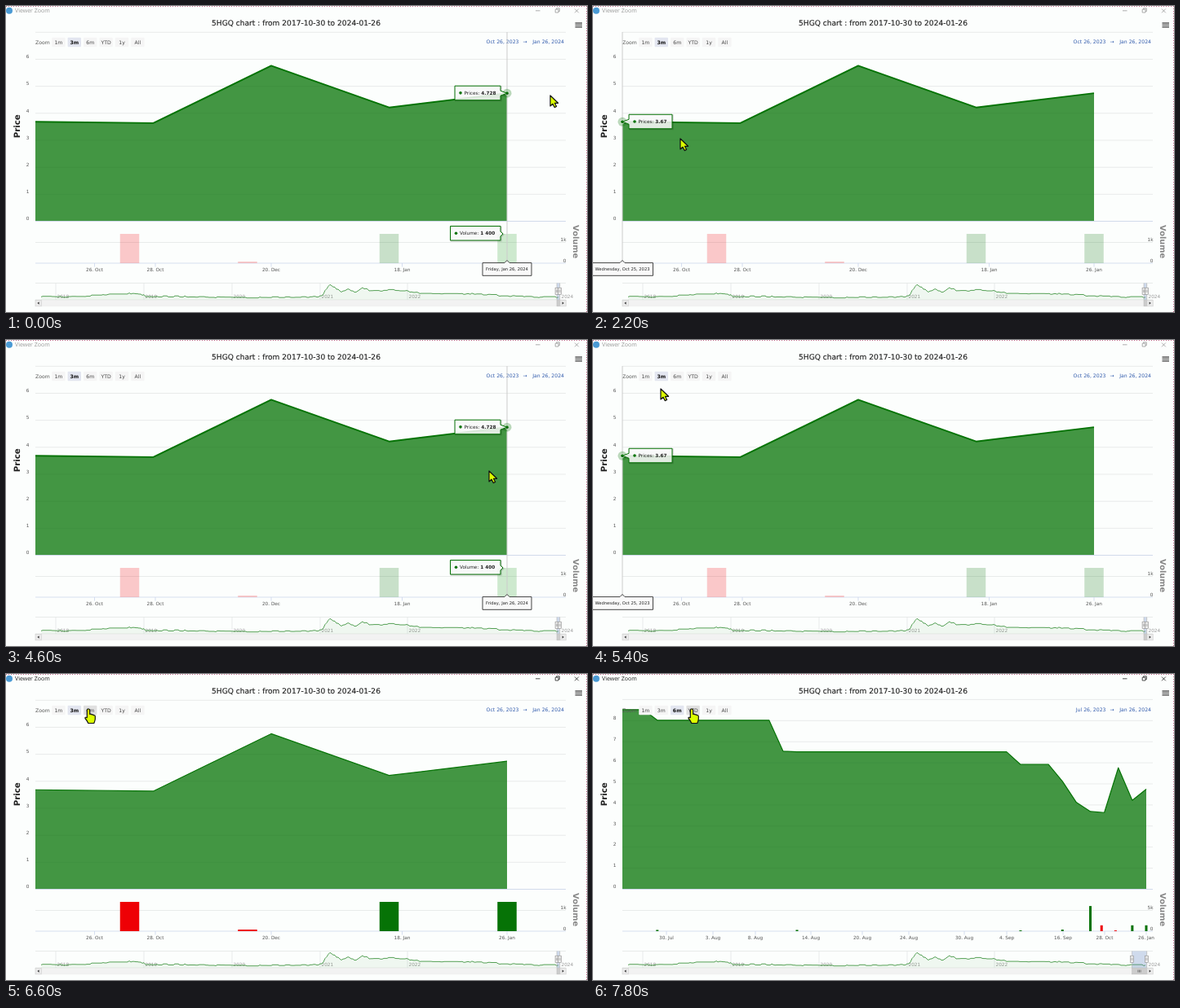
Write an HTML page that moves like this. It is 712 px wide and 376 px high and loops after 8000 ms.

```html
<!DOCTYPE html>
<html lang="en">
<head>
<meta charset="utf-8">
<title>Price chart</title>
<style>
  html, body { margin: 0; width: 100%; height: 100%; overflow: hidden; background: #fcfefd; }
  svg { display: block; width: 712px; height: 376px; }
  text { font: 5.75px "DejaVu Sans", sans-serif; fill: #555; text-rendering: geometricPrecision; white-space: pre; }
  .mid { text-anchor: middle; }
  .end { text-anchor: end; }
  .b { font-weight: bold; }
  .title { font-size: 9.1px; fill: #222; stroke: #222; stroke-width: .15px; }
  .range { font-size: 6.15px; }
  .date { fill: #335cad; }
  .day { font-size: 5.2px; fill: #222; }
  .axis { font-weight: 900; font-size: 10.2px; }
  .win { font: 7px "Open Sans", sans-serif; fill: inherit; }
  .grid { stroke: #e4e6e6; stroke-width: .8; fill: none; }
  .base { stroke: #ccd6eb; stroke-width: .8; fill: none; }
  .year { fill: #999; }
</style>
</head>
<body>
<svg viewBox="0 0 712 376" xmlns="http://www.w3.org/2000/svg">
  <defs>
    <clipPath id="plot"><rect x="36" y="31" width="650" height="285"/></clipPath>
  </defs>
  <rect width="712" height="376" fill="#fcfefd"/>
  <path d="M0 .5H712M711.5 0V376" stroke="#c4688a" stroke-dasharray="1 2" fill="none"/>

  <g id="bar">
    <circle cx="4" cy="5.8" r="4" fill="#4a9ad4" stroke="none"/>
    <text class="win" x="11" y="8.4" stroke="none">Viewer Zoom</text>
    <path fill="none" stroke-width=".8" d="M649 5.8h5.5M673.2 4.2h3.8v3.8h-3.8zM674.5 4v-1.2h3.8v3.8h-1.2M697 3.5l4.8 4.8m0-4.8l-4.8 4.8"/>
  </g>
  <text class="title mid" x="355.5" y="24">5HGQ chart : from 2017-10-30 to 2024-01-26</text>
  <path d="M697.5 21h8.5M697.5 23.4h8.5M697.5 25.8h8.5" stroke="#555" stroke-width="1.4"/>

  <g id="grid"></g>
  <path class="grid" d="M36 290.5H686"/>
  <path class="base" d="M36 264.5H686M36 316H686"/>
  <g id="xaxis"></g>

  <g clip-path="url(#plot)">
    <path id="area" fill="#067306" fill-opacity=".75"/>
    <path id="line" fill="none" stroke="#067306" stroke-linejoin="round"/>
    <g id="bars"></g>
  </g>

  <text class="axis" fill="#222" style="fill:#222" text-anchor="middle" transform="translate(16.7 147.7) rotate(-90)">Price</text>
  <text class="axis" style="fill:#888;font-size:9.8px" text-anchor="middle" transform="translate(694.6 289.6) rotate(90)">Volume</text>
  <text class="end" id="vtop" x="686.5" y="289"></text>
  <text class="end" x="686.5" y="315">0</text>

  <text class="range" x="36" y="47">Zoom</text>
  <g id="buttons"></g>
  <text class="range date" id="from" x="628.5" y="46.3" text-anchor="end"></text>
  <text class="range date mid" x="636.2" y="46.3">→</text>
  <text class="range date end" x="684" y="46.3">Jan 26, 2024</text>

  <g id="nav"></g>
  <g id="window">
    <rect id="mask" y="340.5" height="20.5" fill="#6685c2" fill-opacity=".3"/>
    <rect id="thumb" y="361.3" height="7.6" fill="#ccc" stroke="#bbb" stroke-width=".5"/>
    <path id="rifles" stroke="#444" stroke-width=".6"/>
    <g id="handles"></g>
  </g>

  <g id="tips"></g>
  <path id="arrow" d="M0 0V13L3 10.2 5.2 14.6 7.6 13.5 5.5 9.3H9.6Z" fill="#dcff00" stroke="#111" stroke-width="1.2" stroke-linejoin="round"/>
  <path id="hand" d="M-1.7 1.5Q-1.7 0 0 0T1.7 1.5V6.5Q3 5.7 4.2 7Q5.5 6.4 6.4 7.6Q8.3 7.4 8.3 9.2V12.5Q8 14.5 6.8 17.5H-.2Q-1.5 14.5-4 11.5Q-4.6 9.6-1.7 10.6Z" fill="#dcff00" stroke="#111" stroke-width="1.2" stroke-linejoin="round"/>
</svg>
<script>
const LOOP = 8000, STEP = 100, BASE = 264, FLOOR = 316;
const GREEN = '#067306', RED = '#ee0005';
const $ = id => document.getElementById(id);
const lerp = (a, b, k) => a + (b - a) * k;
const clamp = v => Math.max(0, Math.min(1, v));
const ease = v => (1 - Math.cos(Math.PI * clamp(v))) / 2;
const set = (id, attrs) => { for (const n in attrs) $(id).setAttribute(n, attrs[n]); };
const show = (id, on) => $(id).setAttribute('visibility', on ? 'visible' : 'hidden');
const many = (n, v) => Array(n).fill(v);

// Prices from the newest to the oldest
const prices = [4.728, 4.2, 5.745, 3.62, 3.67, 4.1, 5.1, ...many(3, 5.9),
  ...many(16, 6.5), 6.53, ...many(9, 8), ...many(3, 8.5)];
const wideX = i => 614 - 144.5 * i;
const newX = i => 678 - 17.12 * i;

// [index, volume, colour, side shift in columns, only in the long view]
const volumes = [
  [0, 1400, GREEN, 0], [1, 1400, GREEN, 0], [2, 75, RED, 1], [3, 1400, RED, 1],
  [4, 6000, GREEN, 0, 1], [6, 380, GREEN, 0, 1], [9, 120, GREEN, 0, 1],
  [25, 300, GREEN, 0, 1], [35, 300, GREEN, 0, 1]
];

const points = [
  { x: 614, price: 4.728, vol: '1 400', vy: 280, vx: 609, day: 'Friday, Jan 26, 2024', w: 60 },
  { x: 470, price: 4.2, vol: '1 400', vy: 280, vx: 465, day: 'Thursday, Jan 18, 2024', w: 69 },
  { x: 325, price: 5.745, vol: '75', vy: 314, vx: 325, day: 'Wednesday, Dec 20, 2023', w: 75, red: 1 },
  { x: 181, price: 3.62, vol: '1 400', vy: 280, vx: 176, day: 'Saturday, Oct 28, 2023', w: 68, red: 1 },
  { x: 36, price: 3.67, day: 'Wednesday, Oct 25, 2023', w: 75 }
];

const shortTicks = [['26. Oct', 108.5], ['28. Oct', 183], ['20. Dec', 325], ['18. Jan', 485.5], ['26. Jan', 614]];
const longTicks = [['30. Jul', 90], ['3. Aug', 147], ['8. Aug', 199], ['14. Aug', 267], ['20. Aug', 330],
  ['24. Aug', 387], ['30. Aug', 455], ['4. Sep', 507], ['16. Sep', 576], ['28. Oct', 627], ['26. Jan', 678]];

const buttons = ['1m', '3m', '6m', 'YTD', '1y', 'All'];
const buttonX = i => 64.4 + 19.4 * i;

// Pointer path: time, x, y
const path = [
  [0, 667, 110], [900, 667, 110], [1600, 104, 165], [2100, 104, 164], [2200, 107, 163],
  [2700, 276, 151], [2900, 278, 150], [3000, 281, 150], [3600, 470, 153], [4100, 470, 153],
  [4600, 592, 161], [4800, 592, 161], [5400, 83, 60], [5700, 96, 47], [6300, 101, 43],
  [7100, 101, 43], [7700, 119, 43], [7800, 121, 43], [LOOP, 121, 43]
];

function pointer(t) {
  const n = path.findIndex(p => p[0] > t);
  const a = path[n - 1], b = path[n];
  const k = ease((t - a[0]) / (b[0] - a[0]));
  return [lerp(a[1], b[1], k), lerp(a[2], b[2], k)];
}

function bubble(x, y, w, ax, ay, color, label, value) {
  const h = 17.5, r = x + w, b = y + h, my = Math.min(Math.max(ay, y + 4), b - 4);
  const right = ax > x;
  const d = right
    ? `M${x} ${y}H${r}V${my - 3}L${ax} ${ay}L${r} ${my + 3}V${b}H${x}Z`
    : `M${x} ${y}H${r}V${b}H${x}V${my + 3}L${ax} ${ay}L${x} ${my - 3}Z`;
  return `<path d="${d}" transform="translate(.8 .8)" fill="none" stroke="#000" stroke-opacity=".18" stroke-width="1.6"/>
    <path d="${d}" fill="#f9f9f9" fill-opacity=".87" stroke="${color}" stroke-width="1"/>
    <circle cx="${x + 7}" cy="${y + 8.7}" r="1.8" fill="${color}"/>
    <text x="${x + 11.5}" y="${y + 10.7}" style="fill:#222">${label}: <tspan class="b">${value}</tspan></text>`;
}

function tooltip(p) {
  const y = BASE - p.price * 33.17, w = 41 + 4 * String(p.price).length - (p.price === 3.67 ? 4 : 5);
  const x = p.x < 50 ? p.x + 8 : p.x - 8 - w;
  let s = `<path d="M${p.x} 32V316" stroke="#ccc" stroke-width="1"/>
    <circle cx="${p.x}" cy="${y}" r="5.5" fill="${GREEN}" fill-opacity=".27"/>
    <circle cx="${p.x}" cy="${y}" r="2.3" fill="${GREEN}" stroke="#fff" stroke-width=".7"/>`;
  s += bubble(x, y - 9, w, p.x, y, GREEN, 'Prices', p.price);
  if (p.vol) {
    const vw = p.vol.length > 2 ? 61.5 : 51.5;
    s += bubble(p.x - 8 - vw, Math.min(p.vy - 9.5, 297.3), vw, p.vx, p.vy,
      p.red ? '#cc0022' : GREEN, 'Volume', p.vol);
  }
  const l = p.x - p.w / 2, r = p.x + p.w / 2;
  return s + `<path d="M${l} 315.6H${p.x - 3}L${p.x} 312.5L${p.x + 3} 315.6H${r}V331.3H${l}Z" fill="#f9f9f9" fill-opacity=".92" stroke="#444" stroke-width="1"/>
    <text class="day mid" x="${p.x}" y="325.4">${p.day}</text>`;
}

function drawNav() {
  let seed = 11;
  const rnd = () => (seed = seed * 16807 % 2147483647) / 2147483647;
  const keys = [[43, 357.5], [85, 357.3], [108, 355.5], [128, 353.5], [146, 353], [165, 354], [172, 356.5],
    [215, 357], [270, 358.3], [340, 358], [380, 357.5], [388, 355], [392, 348], [397, 342], [403, 346],
    [410, 351], [418, 348], [428, 352], [437, 346.5], [447, 350], [470, 349], [490, 350], [510, 353],
    [540, 354], [570, 353.5], [600, 355.5], [640, 357], [678, 358.5]];
  let d = '', n = 0, y = 0;
  for (let x = 43; x < 678; x += 2) {
    while (keys[n + 1][0] < x) n++;
    const [a, b] = [keys[n], keys[n + 1]];
    const steep = Math.abs(b[1] - a[1]) > 2;
    if (steep || rnd() < .4) y = lerp(a[1], b[1], (x - a[0]) / (b[0] - a[0])) + (rnd() - .5) * 1.7;
    d += (d ? 'L' : 'M') + x + ' ' + y.toFixed(1);
  }
  let s = `<path class="grid" d="M36 340.5H686M36 361H686"/>`;
  [61, 169, 277, 385, 492, 679].forEach((x, i) => {
    s += `<path class="grid" d="M${x} 340.5V361"/><text class="year" x="${x + 1.5}" y="359">${2018 + i + (i > 4 ? 1 : 0)}</text>`;
  });
  s += `<path d="${d}L678 361H43Z" fill="${GREEN}" fill-opacity=".05"/>
    <path d="${d}" fill="none" stroke="#2c8a2c" stroke-width=".8"/>
    <rect x="43" y="361.3" width="636" height="7.6" fill="#f2f2f2" stroke="#e8e8e8" stroke-width=".5"/>`;
  [36, 679].forEach((x, i) => {
    const c = x + 3.6, k = i ? 1 : -1;
    s += `<rect x="${x}" y="361.3" width="7.2" height="7.6" fill="#ebebeb" stroke="#ccc" stroke-width=".6"/>
      <path d="M${c + k * 1.2} 365.1L${c - k} 363.4V366.8Z" fill="#333"/>`;
  });
  $('nav').innerHTML = s;
}

function drawAxes(k) {
  const unit = lerp(33.17, 25.9, k);
  let s = '';
  for (let v = 0; v < 10; v++) {
    const y = BASE - v * unit;
    if (y < 30) break;
    s += `<path class="grid" d="M36 ${y + .5}H686"/>`;
    if (y > 45) s += `<text class="end" x="28.5" y="${y - .8}" fill-opacity="${v > 6 ? k : 1}">${v}</text>`;
  }
  $('grid').innerHTML = s;
  const ticks = (list, alpha, dx) => `<g opacity="${alpha}">` + list.map(([name, x]) =>
    `<path class="base" d="M${x + dx(x)} 316v4.5"/><text class="mid" x="${x + dx(x)}" y="325.5">${name}</text>`).join('') + '</g>';
  $('xaxis').innerHTML =
    (k < 1 ? ticks(shortTicks, 1 - k, x => k * (newX((614 - x) / 144.5) - x)) : '') +
    (k > 0 ? ticks(longTicks, k, () => 0) : '');
  $('vtop').textContent = k > 0 ? '5k' : '1k';
}

function drawSeries(k, hover, faded, active) {
  const unit = lerp(33.17, 25.9, k);
  const spots = prices.map((v, i) => {
    const j = Math.min(i, 4);
    return [lerp(wideX(j), newX(i), k), BASE - lerp(prices[j] * 33.17, v * 25.9, k)];
  });
  const d = 'M' + spots.map(p => p[0].toFixed(2) + ' ' + p[1].toFixed(2)).join('L');
  set('line', { d, 'stroke-width': hover ? 1.9 : 1.2 });
  set('area', { d: `${d}L${spots[spots.length - 1][0]} ${BASE}H${spots[0][0]}Z` });

  const perK = lerp(25.7, 5.15, k), w = lerp(23.5, 3, k), shift = lerp(29, 3.4, k);
  $('bars').innerHTML = volumes.map(([i, v, color, side, late]) => {
    const x = (late ? newX(i) : lerp(wideX(i), newX(i), k)) - side * shift;
    const h = Math.max(v / 1000 * perK, 1) * (late ? k : 1);
    const lit = i === active && hover;
    return `<rect x="${x - w / 2}" y="${FLOOR - h}" width="${w}" height="${h}" fill="${lit && !side ? '#209a20' : color}" opacity="${lerp(1, .21, faded)}"/>`;
  }).join('');
}

function drawButtons(chosen, over) {
  $('buttons').innerHTML = buttons.map((name, i) => {
    const x = buttonX(i), fill = i === chosen ? '#e3e6f0' : i === over ? '#e0e0e0' : '#f5f5f5';
    return `<rect x="${x - 8.2}" y="38.8" width="16.4" height="11.4" rx="1" fill="${fill}"/>
      <text class="range mid${i === chosen ? ' b' : ''}" x="${x}" y="46.9" style="fill:${i === chosen ? '#111' : '#444'}">${name}</text>`;
  }).join('');
}

function drawWindow(k) {
  const l = lerp(675, 660.5, k), r = 678.5, m = (l + r) / 2;
  set('mask', { x: l, width: r - l });
  set('thumb', { x: l, width: r - l });
  set('rifles', { d: k > .4 ? `M${m - 1.6} 363.6v3M${m} 363.6v3M${m + 1.6} 363.6v3` : '' });
  $('handles').innerHTML = [l, r].map(x =>
    `<path d="M${x} 340.5V361" stroke="#b5b5b5" stroke-width=".6"/>
     <rect x="${x - 1.9}" y="346.3" width="3.8" height="8" fill="#f2f2f2" stroke="#999" stroke-width=".7"/>
     <path d="M${x - .6} 348.5v3.6M${x + .6} 348.5v3.6" stroke="#888" stroke-width=".5"/>`).join('');
}

let last = -1;
function frame(now) {
  requestAnimationFrame(frame);
  const t = Math.floor(now % LOOP / STEP) * STEP;
  if (t === last) return;
  last = t;

  const [x, y] = pointer(t);
  const k = ease((t - 6800) / 700);
  const onButton = y < 51;
  const over = onButton ? Math.round((x - 64.4) / 19.4) : -1;
  const near = Math.max(0, Math.min(4, Math.round((614 - x) / 144.5)));
  const fade = 1 - clamp((t - 5700) / 200);
  const tipAlpha = 1 - clamp((t - 6100) / 200);

  drawAxes(k);
  drawSeries(k, t < 5800, fade, near);
  drawButtons(t >= 6900 ? 2 : 1, over);
  drawWindow(k);
  $('from').textContent = t >= 6900 ? 'Jul 26, 2023' : 'Oct 26, 2023';
  $('tips').innerHTML = tipAlpha > 0 ? tooltip(points[near]) : '';
  set('tips', { opacity: tipAlpha });
  const tone = t >= 6600 ? '#222' : '#999';
  set('bar', { fill: tone, stroke: tone });
  show('arrow', !onButton);
  show('hand', onButton);
  const at = `translate(${x.toFixed(1)} ${y.toFixed(1)})`;
  set('arrow', { transform: at });
  set('hand', { transform: at });
}

drawNav();
frame(performance.now());
</script>
</body>
</html>
```
